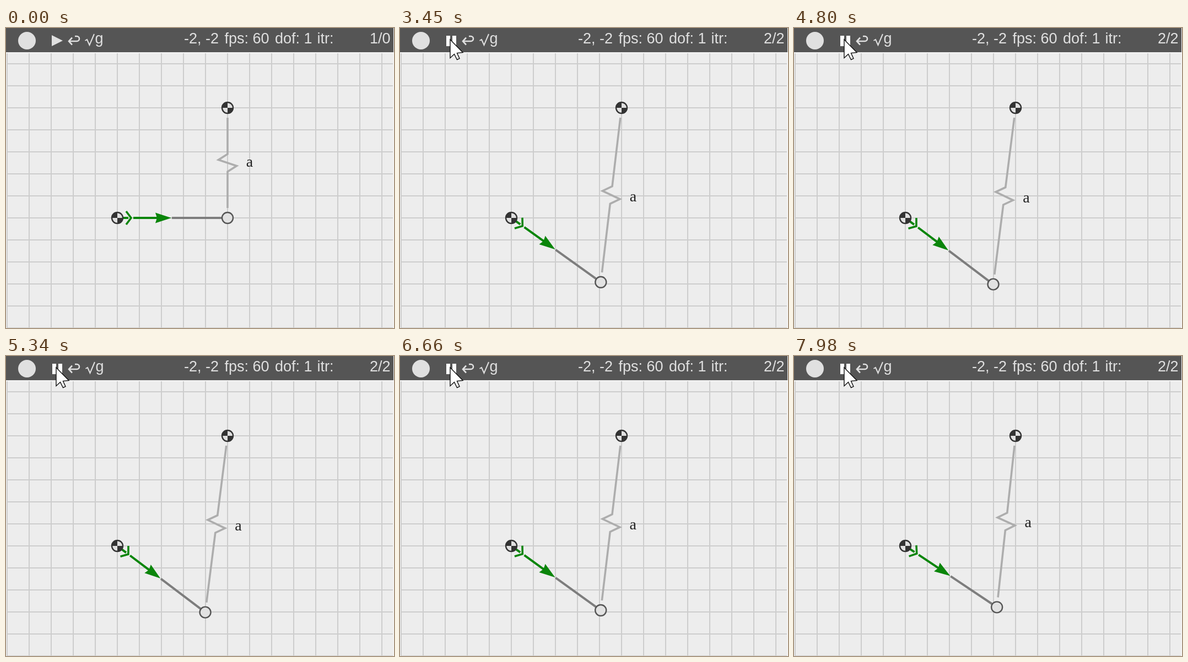
An HTML page with a canvas for the animation above (8000 ms loop, 704 by 545 pixels).

```html
<!DOCTYPE html>
<html lang="en">
<head>
<meta charset="utf-8">
<title>Spring pendulum</title>
<style>
html, body { margin: 0; width: 100%; height: 100%; overflow: hidden; background: #f4f4f4; }
canvas { display: block; }
</style>
</head>
<body>
<canvas id="stage" width="704" height="545"></canvas>
<script>
const ctx = document.getElementById('stage').getContext('2d');
const LOOP = 8000, STEP = 30;
const HOVER = 1290, TIP = 1980, RUN = 3060;
const PIVOT = [202, 345], ANCHOR = [402, 145], ROD = 200;
const GREEN = '#0a850a', DARK = '#333', LIGHT = '#e0e0e0';

function line(points, color, width, closed) {
  ctx.beginPath();
  points.forEach(([x, y]) => ctx.lineTo(x, y));
  if (closed) ctx.closePath();
  ctx.strokeStyle = color;
  ctx.lineWidth = width;
  ctx.stroke();
}

function fill(points, color) {
  ctx.beginPath();
  points.forEach(([x, y]) => ctx.lineTo(x, y));
  ctx.fillStyle = color;
  ctx.fill();
}

function disc(x, y, r, color, edge) {
  ctx.beginPath();
  ctx.arc(x, y, r, 0, 2 * Math.PI);
  ctx.fillStyle = color;
  ctx.fill();
  if (edge) {
    ctx.strokeStyle = edge;
    ctx.lineWidth = 2.4;
    ctx.stroke();
  }
}

function text(str, x, y, font, color, align = 'left') {
  ctx.font = font;
  ctx.fillStyle = color;
  ctx.textAlign = align;
  ctx.fillText(str, x, y);
}

// Draw in a frame with its origin at (x, y), turned by the angle
function within(x, y, angle, draw) {
  ctx.save();
  ctx.translate(x, y);
  ctx.rotate(angle);
  draw();
  ctx.restore();
}

// Rod angle below the horizontal: a damped swing about 30 degrees
function rodAngle(t) {
  const s = t / 1000;
  if (s < 3.074) return 0;
  const y = s - 4.8;
  const phase = -1.29 + 4.738 * y + 0.0145 * y * y;
  const swing = Math.min(30, 28.8 * Math.exp(-0.1103 * (s - 3.74)));
  return (30 + swing * Math.cos(phase)) * Math.PI / 180;
}

function grid() {
  ctx.fillStyle = '#f4f4f4';
  ctx.fillRect(0, 0, 704, 545);
  ctx.fillStyle = '#ededed';
  ctx.fillRect(1, 46, 701, 499);
  ctx.fillStyle = '#cdcdcd';
  for (let x = 1; x < 702; x += 40) ctx.fillRect(x, 46, 2, 499);
  for (let y = 64; y < 545; y += 40) ctx.fillRect(1, y, 701, 2);
}

function baseNode([x, y]) {
  disc(x, y, 10, LIGHT, DARK);
  ctx.fillStyle = DARK;
  for (const start of [Math.PI, 0]) {
    ctx.beginPath();
    ctx.moveTo(x, y);
    ctx.arc(x, y, 10, start, start + Math.PI / 2);
    ctx.fill();
  }
}

function rod(angle) {
  within(...PIVOT, angle, () => {
    line([[99, 0], [ROD - 10, 0]], '#7d7d7d', 4);
    line([[10, 0], [20, 0]], GREEN, 4);
    line([[16, -12], [25, 0], [16, 12]], GREEN, 3.6);
    line([[29, 0], [74, 0]], GREEN, 4);
    fill([[69, -9.5], [98, 0], [69, 9.5], [72, 0]], GREEN);
  });
}

function spring(x, y) {
  const dx = x - ANCHOR[0], dy = y - ANCHOR[1];
  const half = Math.hypot(dx, dy) / 2, angle = Math.atan2(dy, dx);
  const mx = ANCHOR[0] + dx / 2, my = ANCHOR[1] + dy / 2;
  within(mx, my, angle, () => line([
    [18 - half, 0], [-16, 0], [-5.5, 16.5], [5.5, -16.5], [16, 0], [half - 18, 0]
  ], '#adadad', 3.6));
  text('a', mx + 40 * Math.sin(angle), my - 40 * Math.cos(angle) + 6.5,
    '28px "Liberation Serif", serif', '#222', 'center');
}

function toolbar(t) {
  const running = t >= RUN;
  ctx.fillStyle = '#555';
  ctx.fillRect(0, 0, 703, 44);
  disc(38, 23, 16, LIGHT);

  const icon = t >= HOVER ? '#fff' : LIGHT;
  if (running) {
    ctx.fillStyle = icon;
    ctx.fillRect(84, 14, 7, 19);
    ctx.fillRect(95, 14, 7, 19);
  } else {
    fill([[83, 13], [103, 23], [83, 33]], icon);
  }

  line([[120, 17.5], [114, 24], [120, 30.5]], LIGHT, 2.6);
  ctx.beginPath();
  ctx.moveTo(114, 24);
  ctx.lineTo(128, 24);
  ctx.arc(128.5, 19.5, 4.5, Math.PI / 2, -Math.PI / 2, true);
  ctx.lineTo(125, 15);
  ctx.stroke();

  const shift = running ? 1 : 0;
  within(shift, 0, 0, () =>
    line([[143.5, 23], [147, 21], [151.5, 31], [160, 11]], LIGHT, 2));

  const label = (str, x, align) =>
    text(str, x, 28, '27px "Liberation Sans", Arial, sans-serif', LIGHT, align);
  label('g', 161.5 + shift);
  label('-2, -2', 386, 'right');
  label('fps: 60', 396.5);
  label('dof: 1', 488);
  label('itr:', 564.5);
  label(running ? '2/2' : '1/0', 697.5, 'right');
}

function tooltip() {
  ctx.fillStyle = '#f8ffff';
  ctx.fillRect(109, 49, 140, 50);
  ctx.strokeStyle = '#404040';
  ctx.lineWidth = 2;
  ctx.strokeRect(110, 50, 138, 48);
  text('run/pause', 178.5, 83, '22px "Noto Sans", "Open Sans", sans-serif', '#444', 'center');
}

function pointer(t) {
  const p = Math.min(1, (t - 960) / 690), ease = 1 - (1 - p) ** 2;
  const shape = [[0, 0], [0, 33.5], [7.5, 26.5], [12.5, 36.5], [17, 34.5], [12.5, 24.5], [23, 23.5]];
  within(85 + 6 * ease, -36 + 57 * ease, 0, () => {
    fill(shape, '#fff');
    line(shape, '#111', 1.4, true);
  });
}

function draw(now) {
  const t = Math.floor(now % LOOP / STEP) * STEP;
  const angle = rodAngle(t);
  const x = PIVOT[0] + ROD * Math.cos(angle), y = PIVOT[1] + ROD * Math.sin(angle);
  grid();
  rod(angle);
  spring(x, y);
  baseNode(PIVOT);
  baseNode(ANCHOR);
  disc(x, y, 10, '#e2e2e2', '#555');
  toolbar(t);
  if (t >= TIP && t < RUN) tooltip();
  if (t >= 990) pointer(t);
}

const start = performance.now();
function tick() {
  draw(performance.now() - start);
  requestAnimationFrame(tick);
}
tick();
</script>
</body>
</html>
```
